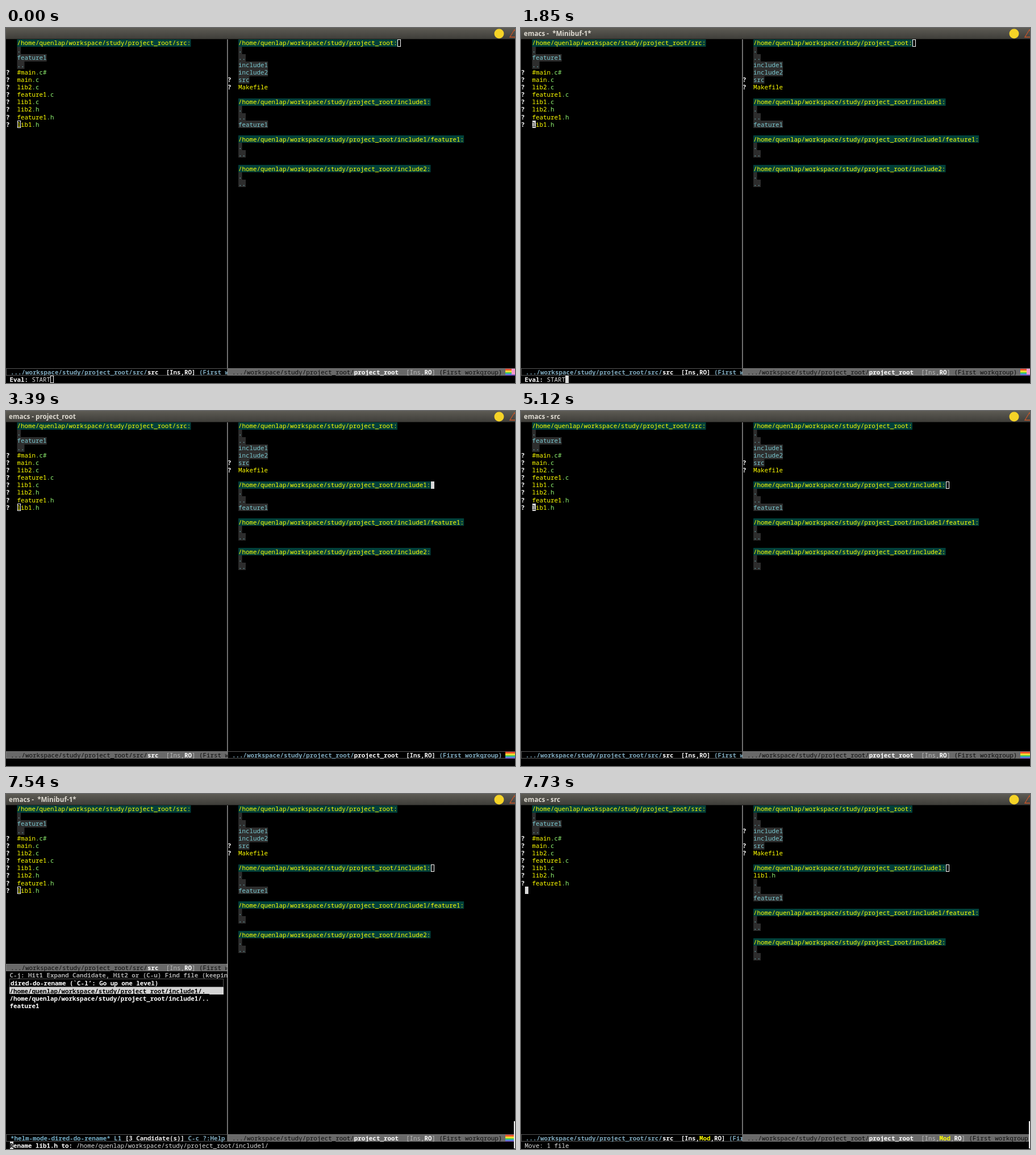
Animation of 896x625 px, one loop 8 s. Source, as an HTML page with a canvas:

```html
<!DOCTYPE html>
<html lang="en">
<head>
<meta charset="utf-8">
<title>Dired rename</title>
<style>
html, body { margin: 0; width: 100%; height: 100%; overflow: hidden; background: #000; }
canvas { display: block; }
</style>
</head>
<body>
<canvas id="stage" width="896" height="625"></canvas>
<script>
const ctx = document.getElementById('stage').getContext('2d');
const CW = 6.51, LH = 13.02, TOP = 19.5, SPLIT = 390, MODE = 599, ECHO = 612;
const LEFT = 6.5, RIGHT = 396;
const YELLOW = '#ffff00', SUFFIX = '#8ff070', CYAN = '#79c7cf', BLUE = '#7fa9bd', WHITE = '#fff';
const ROOT = '/home/quenlap/workspace/study/project_root';

// Each state keeps the values of the one before, apart from what it lists.
const steps = [
  [0, { title: '', active: 'left', pointL: 'hollow', pointR: 'hollow', rowR: 0, colR: 45,
        cat: true, helm: false, edge: false, gone: false, moved: false,
        echo: [['Eval: ', WHITE, 1], ['START', '#ddd']], echoCol: 11, echoPoint: 'hollow' }],
  [700, { title: 'emacs -  *Minibuf-1*' }],
  [760, { echoPoint: 'solid' }],
  [1850, { pointL: 'solid' }],
  [1910, { title: 'emacs - src', echo: [['Quit', '#ddd']], echoPoint: '' }],
  [2280, { echo: [] }],
  [2600, { title: 'emacs - project_root', active: 'right', pointL: 'hollow', pointR: 'solid' }],
  [3330, { rowR: 8, colR: 54 }],
  [3390, { cat: false }],
  [5120, { title: 'emacs - src', active: 'left', pointL: 'solid', pointR: 'hollow' }],
  [5240, { edge: true }],
  [6230, { helm: true, pointL: 'hollow', echo: [['Rename', WHITE, 1]] }],
  [6290, { title: 'emacs -  *Minibuf-1*', echoCol: 70, echoPoint: 'solid',
           echo: [['Rename lib1.h to: ', WHITE, 1], [ROOT + '/include1/', '#ddd']] }],
  [7540, { echoCol: 0 }],
  [7600, { title: 'emacs - src', helm: false, pointL: 'solid', echo: [], echoPoint: '' }],
  [7670, { gone: true, echo: [['Move: 1 file', '#ddd']] }],
  [7730, { moved: true }]
];

function rect(x, y, w, h, color) {
  ctx.fillStyle = color;
  ctx.fillRect(x, y, w, h);
}

function frame(x, y, w, h, color) {
  ctx.strokeStyle = color;
  ctx.lineWidth = 1;
  ctx.strokeRect(x + .5, y + .5, w - 1, h - 1);
}

function text(x, top, str, color, bold) {
  ctx.font = (bold ? 'bold ' : '') + '10.85px "Noto Sans Mono", "DejaVu Sans Mono", monospace';
  ctx.fillStyle = color;
  ctx.fillText(str, x, Math.round(top + 10.8));
}

function runs(x, top, list) {
  for (const [str, color, bold] of list) {
    text(x, top, str, color, bold);
    x += str.length * CW;
  }
}

function clipped(x, y, w, h, draw) {
  ctx.save();
  ctx.beginPath();
  ctx.rect(x, y, w, h);
  ctx.clip();
  draw();
  ctx.restore();
}

function cursor(x, top, kind, char = '', bold = false) {
  if (!kind) return;
  const left = Math.round(x), y = Math.round(top);
  if (kind === 'hollow') return frame(left, y, 6, 13, WHITE);
  rect(left, y, 6, 13, '#d8d8d8');
  text(x, top, char, '#000', bold);
}

// Headings start with "/", directories end with "/", "?" marks untracked entries.
function listing(x, fringe, lines) {
  lines.forEach((line, i) => {
    if (!line) return;
    const top = TOP + i * LH;
    if (line[0] === '?') {
      text(fringe, top, '?', WHITE, 1);
      line = line.slice(1);
    }
    const heading = line[0] === '/', dir = !heading && line.endsWith('/');
    if (dir) line = line.slice(0, -1);
    if (heading || dir) {
      rect(x, Math.round(top), line.length * CW, 13, heading ? '#00403a' : '#2d2d2d');
      text(x, top, line, heading ? YELLOW : CYAN);
    } else {
      const [base, ext] = line.split('.');
      runs(x, top, [[base, YELLOW], [ext ? '.' + ext : '', SUFFIX]]);
    }
  });
}

function bar(x, w, top, active) {
  rect(x, top, w, 13, active ? '#000' : '#696969');
  frame(x, top, w, 13, active ? '#555' : '#787878');
}

function modeline(x, w, top, active, path, name, modified) {
  const dim = active ? BLUE : '#0c0c0c', flag = active ? '#eee' : '#bdbdbd';
  bar(x, w, top, active);
  clipped(x, top, w, 13, () => runs(x + 1.5, top, [
    [' ' + path, dim, active], [name, WHITE, 1], ['  [', flag, active], ['Ins', flag, active],
    [',', flag, active], [modified ? 'Mod' : '', YELLOW, 1], [modified ? ',' : '', flag, active],
    ['RO', WHITE, 1], ['] ', flag, active], ['(First workgroup)', dim, active]
  ]));
}

function titleBar(title) {
  const shade = ctx.createLinearGradient(0, 0, 0, 20);
  shade.addColorStop(0, '#5d5b54');
  shade.addColorStop(1, '#3d3c38');
  rect(0, 0, 896, 19.5, shade);
  ctx.font = 'bold 11.7px "Open Sans", "Noto Sans", sans-serif';
  ctx.fillStyle = '#dfdbd2';
  ctx.fillText(title, 5, 14);
  ctx.fillStyle = '#f5d327';
  ctx.beginPath();
  ctx.arc(868, 10, 8.5, 0, 7);
  ctx.fill();
  ctx.strokeStyle = '#c8562a';
  ctx.lineWidth = 1.3;
  ctx.stroke(new Path2D('M895 3L887 16H903Z'));
}

function progress(cat) {
  ['#e8402c', '#f59a23', '#f4ea3a', '#4fca45', '#369bd8', '#7657c0'].forEach((color, i) =>
    rect(879, 600 + i * 2, 17, 2, color));
  if (cat) rect(890, 600, 6, 10, '#f79ad0');
}

function helmWindow() {
  rect(0, 312, 389, 287, '#000');
  text(LEFT, 312, 'C-j: Hit1 Expand Candidate, Hit2 or (C-u) Find file (keepin', '#aaa', 1);
  frame(6, 325, 377, 15, '#555');
  text(8, 326, 'dired-do-rename (`C-l\u2019: Go up one level)', WHITE, 1);
  rect(6, 340, 377, 13, '#d3d3d3');
  rect(6, 352, 352, 1, '#000');
  text(LEFT, 340, ROOT + '/include1/.', '#000', 1);
  text(LEFT, 353, ROOT + '/include1/..', WHITE, 1);
  text(LEFT, 366, 'feature1', WHITE, 1);
  bar(0, SPLIT, MODE, true);
  runs(8, MODE, [['*helm-mode-dired-do-rename*', '#74afc8', 1], [' L1 ', BLUE, 1],
    ['[3 Candidate(s)]', '#eee', 1], [' C-c ?:Help', BLUE, 1]]);
}

function leftWindow(s) {
  const files = ['#main.c#', 'main.c', 'lib2.c', 'feature1.c', 'lib1.c', 'lib2.h', 'feature1.h'];
  if (!s.gone) files.push('lib1.h');
  listing(LEFT + 2 * CW, 0, [ROOT + '/src:', './', 'feature1/', '../', ...files.map(f => '?' + f)]);
  cursor(LEFT + (s.gone ? 0 : 2 * CW), TOP + 11 * LH, s.pointL, s.gone ? '' : 'l');
  modeline(0, SPLIT, s.helm ? 299 : MODE, s.active === 'left' && !s.helm,
    '.../workspace/study/project_root/src/', 'src', s.moved);
  if (s.helm) helmWindow();
}

function rightWindow(s) {
  listing(RIGHT + 2 * CW, SPLIT, [
    ROOT + ':', './', '../', (s.moved ? '?' : '') + 'include1/', 'include2/', '?src/', '?Makefile', '',
    ROOT + '/include1:', ...(s.moved ? ['lib1.h'] : []), './', '../', 'feature1/', '',
    ROOT + '/include1/feature1:', './', '../', '',
    ROOT + '/include2:', './', '../'
  ]);
  cursor(RIGHT + s.colR * CW, TOP + s.rowR * LH, s.pointR);
  modeline(SPLIT, 506, MODE, s.active === 'right', '.../workspace/study/project_root/', 'project_root', s.moved);
  if (!s.moved) progress(s.cat);
}

function draw(now) {
  const time = now % 8000;
  const s = Object.assign({}, ...steps.filter(([at]) => at <= time).map(step => step[1]));
  rect(0, 0, 896, 625, '#000');
  titleBar(s.title);
  leftWindow(s);
  rightWindow(s);
  rect(389.4, 20, 1, MODE - 20, '#ddd');
  if (s.edge) rect(894, 576, 2, 48, '#eee');
  runs(LEFT, ECHO, s.echo);
  cursor(LEFT + s.echoCol * CW, ECHO, s.echoPoint, s.echoCol ? '' : 'R', true);
}

const start = performance.now();
function tick() {
  draw(performance.now() - start);
  requestAnimationFrame(tick);
}
tick();
</script>
</body>
</html>
```
